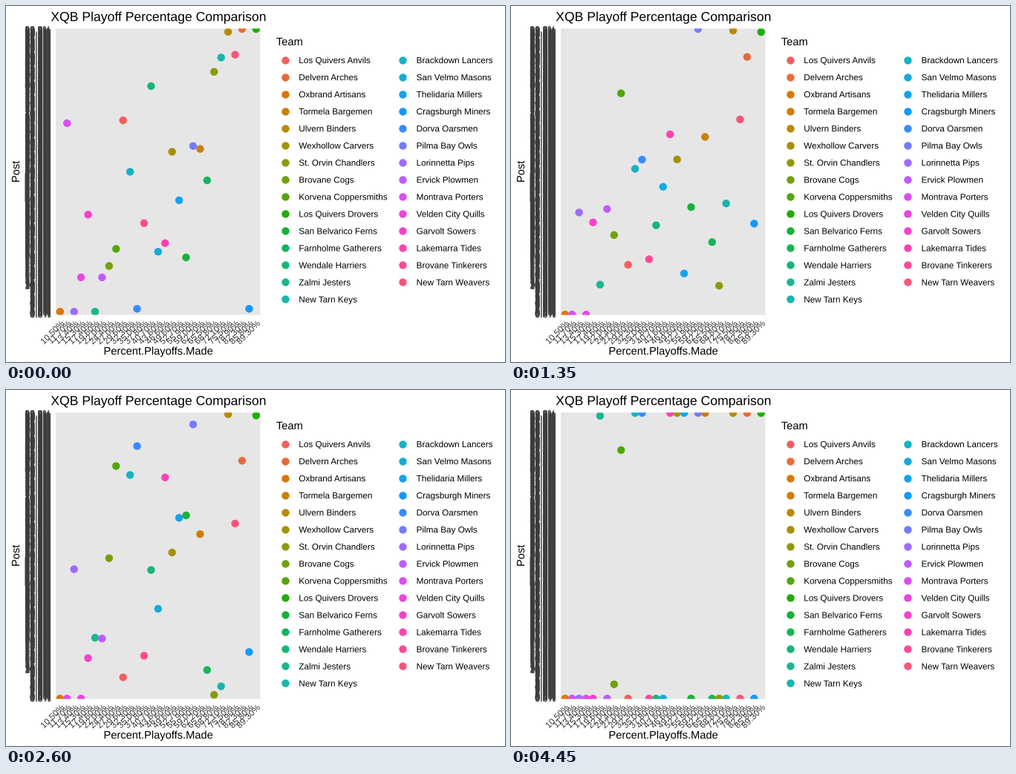
Write a matplotlib script that moves like this. It is 672 by 480 pixels and loops after 5 s.

```python
import numpy as np
import matplotlib.pyplot as plt
from matplotlib.animation import FuncAnimation
from matplotlib.collections import PathCollection
from matplotlib.patches import Rectangle
from matplotlib.textpath import TextPath
from matplotlib.transforms import Affine2D

plt.rcParams["font.family"] = "Liberation Sans"

WIDTH, HEIGHT, DPI = 672, 480, 96
FRAMES, INTERVAL = 100, 50
LEFT, RIGHT, TOP, BOTTOM = 67.1, 342.5, 30.4, 416.6
DARK_GREY, PANEL_GREY = "#3c3c3c", "#e6e6e6"
TITLE, HEADING, LABEL = 17.6, 14.67, 11.73  # text sizes in pixels
DOT_AREA = 7.8 ** 2
LEGEND_ROWS, ROW_STEP = 15, 23.04

# Odds in percent at the key frames; the last value stays to the end.
KEY_FRAMES = (0, 17, 36, 64, 89)
ODDS = {
    "Oxbrand Artisans": (1, 0),
    "Montrava Porters": (67, 0),
    "Lorinnetta Pips": (1, 1, 67, 29, 0),
    "Velden City Quills": (13, 0),
    "Garvolt Sowers": (35, 67, 1, 24, 0),
    "Zalmi Jesters": (1, 1, 19, 23, 99),
    "Ervick Plowmen": (13, 28, 45, 3, 0),
    "Brovane Cogs": (17, 41, 16, 74, 5),
    "Korvena Coppersmiths": (23, 68, 86, 78, 87),
    "Los Quivers Anvils": (68, 19, 16, 1, 0),
    "Brackdown Lancers": (50, 50, 52, 98, 100),
    "Dorva Oarsmen": (2, 29, 77, 97, 100),
    "Brovane Tinkerers": (32, 2, 35, 0),
    "Wendale Harriers": (80, 16, 45, 45, 0),
    "San Velmo Masons": (22, 50, 40, 25, 0),
    "Lakemarra Tides": (25, 51, 74, 80, 100),
    "Wexhollow Carvers": (57, 68, 42, 58, 100),
    "Thelidaria Millers": (40, 7, 21, 95, 100),
    "San Belvarico Ferns": (20, 5, 67, 62, 0),
    "Pilma Bay Owls": (59, 100, 100, 93, 100),
    "Tormela Bargemen": (58, 68, 57, 58, 100),
    "Farnholme Gatherers": (47, 38, 14, 7, 0),
    "St. Orvin Chandlers": (85, 18, 3, 0),
    "New Tarn Keys": (90, 71, 10, 0),
    "Ulvern Binders": (99, 100, 99, 100),
    "New Tarn Weavers": (91, 52, 83, 45, 0),
    "Delvern Arches": (100, 96, 85, 82, 100),
    "Cragsburgh Miners": (2, 25, 38, 0),
    "Los Quivers Drovers": (100, 100, 98, 100),
}
COUNT = len(ODDS)
LEGEND = sorted(ODDS, key=lambda name: name.split()[-1])

XYZ_TO_RGB = np.array([[3.24, -1.54, -0.50], [-0.97, 1.88, 0.04], [0.06, -0.20, 1.06]])
RGB_TO_DEVICE = np.array([[0.975, 0.027, -0.002],
                          [-0.020, 1.054, -0.034],
                          [0.002, 0.002, 0.996]])


def hue_color(degrees, chroma=100, lum=65):
    """Polar LUV colour, shown in a device space with gamma 1.8."""
    angle = np.radians(degrees)
    u = chroma * np.cos(angle) / (13 * lum) + 0.19784
    v = chroma * np.sin(angle) / (13 * lum) + 0.46834
    y = ((lum + 16) / 116) ** 3
    x = 9 * y * u / (4 * v)
    z = 3 * y / v - 5 * y - x / 3
    linear = np.clip(XYZ_TO_RGB @ (x, y, z), 0, 1)
    return np.clip(RGB_TO_DEVICE @ linear, 0, 1) ** (1 / 1.8)


def odds_to_y(odds):
    return 416 - 3.85 * np.asarray(odds)


def outline(text, x, y, size, anchor=0.0, angle=0):
    """Text as a path; anchor runs from 0 (left) to 1 (right)."""
    path = TextPath((0, 0), text, size=size)
    width = path.vertices[:, 0].max()
    place = Affine2D().translate(-anchor * width, 0).rotate_deg(angle)
    return place.scale(1, -1).translate(x, y).transform_path(path)


fig = plt.figure(figsize=(WIDTH / DPI, HEIGHT / DPI), dpi=DPI, facecolor="white")
ax = fig.add_axes([0, 0, 1, 1])
ax.set_xlim(0, WIDTH)
ax.set_ylim(HEIGHT, 0)
ax.axis("off")


def box(top, bottom, color, zorder):
    ax.add_patch(Rectangle((LEFT, top), RIGHT - LEFT, bottom - top, facecolor=color,
                           linewidth=0, snap=False, zorder=zorder))


def draw_text(outlines, color):
    ax.add_collection(PathCollection(outlines, facecolor=color, edgecolor="none",
                                     linewidth=0, zorder=5), autolim=False)


# White strips above and below cut the dots off at the panel's edges.
box(TOP - 8, BOTTOM + 8, PANEL_GREY, 1)
box(TOP - 10, TOP, "white", 3)
box(BOTTOM, BOTTOM + 10, "white", 3)

team_x = 72.8 + 9.43 * np.arange(COUNT)
middle_x, middle_y = (LEFT + RIGHT) / 2, (TOP + BOTTOM) / 2

black = [
    outline("XQB Playoff Percentage Comparison", middle_x, 20.3, TITLE, 0.5),
    outline("Percent.Playoffs.Made", middle_x, 470, HEADING, 0.5),
    outline("Post", 18, middle_y, HEADING, 0.5, angle=90),
    outline("Team", 363.9, 53, HEADING),
]

percents = 10.5 + 78.8 * np.linspace(0, 1, COUNT) ** 1.25
grey = [outline(f"{percent:.1f}0%", x + 6, 429, LABEL, 1, angle=45)
        for x, percent in zip(team_x, percents)]

# Hundreds of tick labels pile up into a dark band.
for level in np.linspace(0, 99.9, 480):
    grey.append(outline(f"{level:.1f}%", 60, odds_to_y(level) + 4.3, 12.4, 1))

colors = {name: hue_color(15 + 360 * i / COUNT) for i, name in enumerate(LEGEND)}

for i, name in enumerate(LEGEND):
    side, row = divmod(i, LEGEND_ROWS)
    x, y = 375.5 + 158.3 * side, 72.9 + ROW_STEP * row
    ax.scatter([x], [y], s=DOT_AREA, color=[colors[name]], linewidth=0)
    black.append(outline(name, x + 18.8, y + 4.2, LABEL))

draw_text(black, "black")
draw_text(grey, DARK_GREY)

dots = ax.scatter(team_x, odds_to_y(np.zeros(COUNT)), s=DOT_AREA, linewidth=0,
                  color=[colors[name] for name in ODDS], zorder=2)


def update(frame):
    odds = [np.interp(frame, KEY_FRAMES[:len(path)], path) for path in ODDS.values()]
    dots.set_offsets(np.column_stack([team_x, odds_to_y(odds)]))
    return [dots]


animation = FuncAnimation(fig, update, frames=FRAMES, interval=INTERVAL,
                          repeat=True, repeat_delay=0)
plt.show()
```
